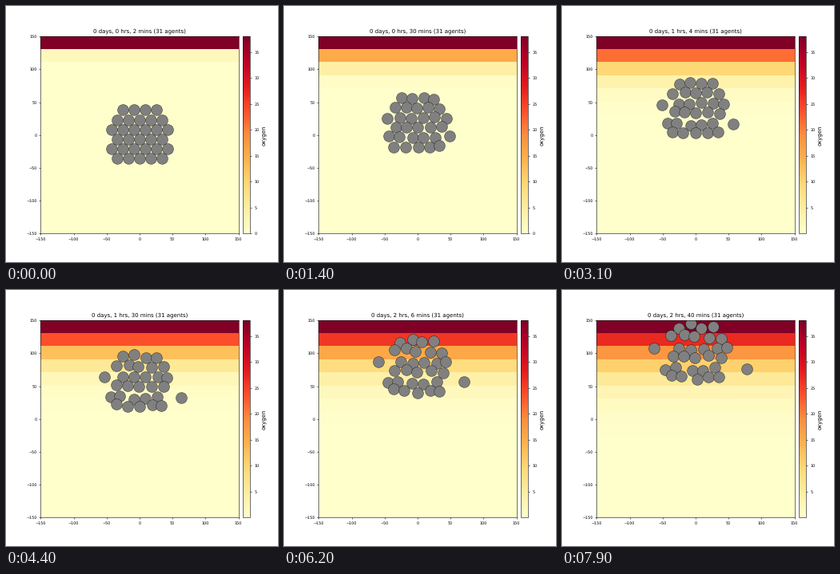
A matplotlib script that plays this animation: 340x321 px, repeating every 8 s.

```python
import matplotlib.pyplot as plt
import numpy as np
from matplotlib.animation import FuncAnimation
from matplotlib.collections import EllipseCollection

W, H, DPI = 340, 321, 50
FRAMES, INTERVAL = 80, 100
MINUTES = 2                                  # simulated time per frame
LEFT, BOTTOM, SIDE = 43.4, 35.6, 247.2       # plot square, px

HALF, ROWS = 150, 15
O2_MAX, RATE = 38, 0.0235

ROW_COUNTS = (4, 5, 6, 5, 6, 5)
GAP_X, GAP_Y, TOP_Y = 17.2, 14.7, 38
RADIUS = 8.41
RISE, SPREAD, WANDER = 1.27, 0.0011, 0.3     # per frame
CONTACT = 13.5


def hex_cluster():
    return np.array([((k - (n - 1) / 2) * GAP_X, TOP_Y - r * GAP_Y)
                     for r, n in enumerate(ROW_COUNTS) for k in range(n)])


def separate(pos):
    """Push apart cells that overlap too deeply."""
    delta = pos[:, None] - pos[None]
    dist = np.hypot(delta[..., 0], delta[..., 1]) + 1e-9
    push = np.clip(CONTACT - dist, 0, None) / dist
    np.fill_diagonal(push, 0)
    return pos + 0.25 * (push[..., None] * delta).sum(axis=1)


def migrate():
    """Cells climb towards the oxygen while spreading and wandering."""
    rng = np.random.default_rng(4)
    start = hex_cluster()
    offset = np.zeros_like(start)
    # The outer ends of the two widest rows stray from the group
    stray = np.zeros_like(start)
    stray[sum(ROW_COUNTS[:2])] = -0.25, 0
    stray[sum(ROW_COUNTS[:5]) - 1] = 0.4, 0
    history = []
    for i in range(FRAMES):
        base = start * (1 + SPREAD * i) + (0, RISE * i)
        if i:
            offset = offset + stray + rng.normal(0, WANDER, start.shape)
            offset = separate(base + offset) - base
        history.append(base + offset)
    return history


def diffuse():
    """Oxygen per row for every frame, with the top row held at its maximum."""
    u = np.zeros(ROWS)
    u[0] = O2_MAX
    sub = 8
    history = []
    for _ in range(FRAMES):
        for _ in range(sub):
            padded = np.pad(u, 1, mode="edge")
            u = u + RATE * MINUTES / sub * (padded[2:] - 2 * u + padded[:-2])
            u[0] = O2_MAX
        history.append(u)
    return history


agents, oxygen = migrate(), diffuse()

plt.rcParams.update({"font.family": "DejaVu Sans", "text.hinting": "none"})
fig = plt.figure(figsize=(W / DPI, H / DPI), dpi=DPI, facecolor="white")


def add_axes(x, width):
    return fig.add_axes([x / W, BOTTOM / H, width / W, SIDE / H])


ax = add_axes(LEFT, SIDE)
cax = add_axes(LEFT + SIDE + 5, 0.04 * SIDE)

field = ax.imshow(oxygen[0][:, None], extent=(-HALF, HALF, -HALF, HALF),
                  cmap="YlOrRd", vmin=0, vmax=O2_MAX,
                  interpolation="nearest", aspect="auto")
cells = EllipseCollection([2 * RADIUS], [2 * RADIUS], [0], units="xy",
                          offsets=agents[0], offset_transform=ax.transData,
                          facecolor="gray", edgecolor="black", linewidth=0.5)
ax.add_collection(cells)
ax.set(xlim=(-HALF, HALF), ylim=(-HALF, HALF))
ticks = range(-HALF, HALF + 1, 50)
ax.set_xticks(ticks)
ax.set_yticks(ticks)
ax.tick_params(labelsize=7)
title = ax.set_title("", fontsize=10)

bar = fig.colorbar(field, cax=cax)
bar.ax.tick_params(labelsize=7)
bar.set_label("oxygen", fontsize=10)


def update(i):
    hours, minutes = divmod(MINUTES * (i + 1), 60)
    title.set_text(f"0 days, {hours} hrs, {minutes} mins "
                   f"({len(agents[i])} agents)")
    field.set_data(oxygen[i][:, None])
    cells.set_offsets(agents[i])
    # The zero tick drops out once oxygen reaches the bottom row
    bar.set_ticks(range(0 if i < 23 else 5, O2_MAX, 5))
    return field, cells, title


anim = FuncAnimation(fig, update, frames=FRAMES, interval=INTERVAL,
                     init_func=lambda: update(0), repeat=True, repeat_delay=0)
plt.show()
```
